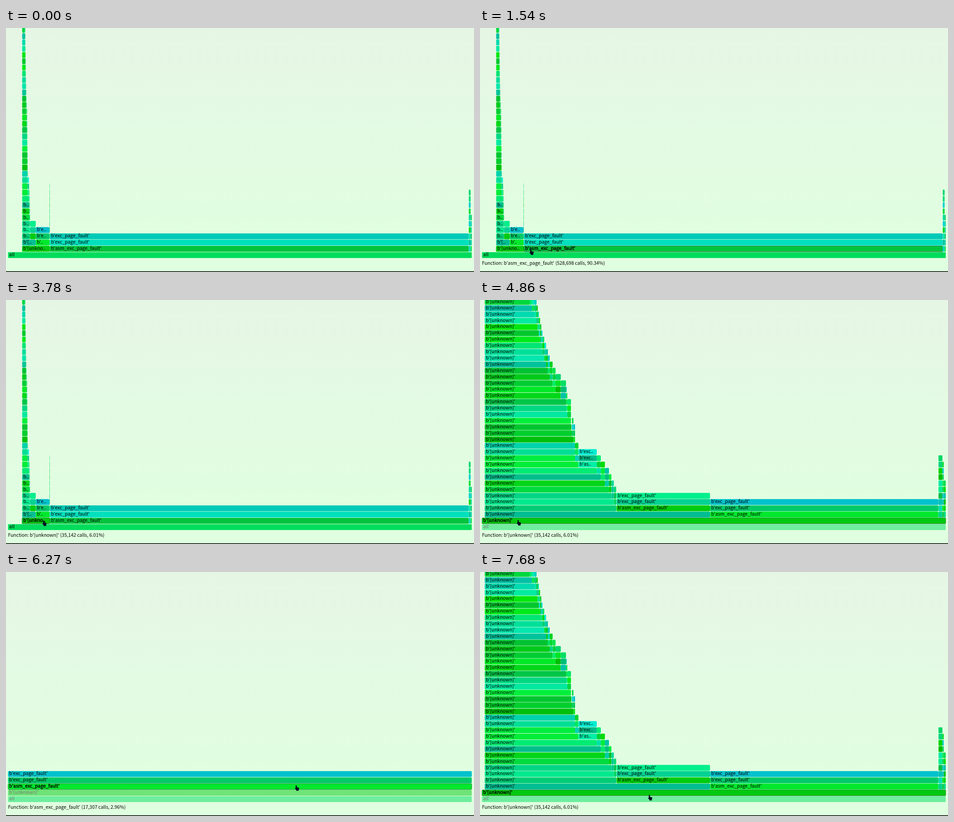
An HTML page for the animation above (8.08 s loop, 1034 by 542 pixels).

```html
<!DOCTYPE html>
<html lang="en">
<head>
<meta charset="utf-8">
<title>Flame graph</title>
<style>
  html, body { margin: 0; width: 100%; height: 100%; overflow: hidden; background: #e0ffe0; }
  svg { display: block; width: 1034px; height: 542px; }
  text { font-family: "Noto Sans CJK JP", "Noto Sans CJK SC", "Noto Sans CJK", sans-serif; font-size: 10.42px; fill: #000; }
  .hover { stroke: #000; stroke-width: .44px; }
  .parent { opacity: .5; }
</style>
</head>
<body>
<svg viewBox="0 0 1034 542">
  <defs>
    <linearGradient id="bg" x1="0" y1="0" x2="0" y2="1">
      <stop offset="0" stop-color="#e6f6e5"/>
      <stop offset=".94" stop-color="#e0ffe0"/>
    </linearGradient>
  </defs>
  <rect width="1034" height="542" fill="url(#bg)"/>
  <g id="graph"></g>
  <text id="status" x="4.5" y="525.7"></text>
  <rect y="540.5" width="1034" height="1.5" fill="#000"/>
  <path id="cursor" fill="#08081f" d="M-.1 1.1q0 -1.4 1.3 -1.4t1.3 1.4v3l4.1 .8q1.2 .4 1 2l-1 3.2v1.8h-5.2v-1.4l-2.8 -3.2q-.6 -1.2 .6 -1.6l.7 .4z"/>
</svg>
<script>
const $ = id => document.getElementById(id);
const LOOP = 8080, TOTAL = 585203;
const S = 0.8682, LEFT = 4.5, FULL = 1024.5, BASE = 497.9;
const EXC = "b'exc_page_fault'", ASM = "b'asm_exc_page_fault'", UNK = "b'[unknown]'";

let seed = 11;
const rnd = () => (seed = seed * 16807 % 2147483647) / 2147483647;
const shade = (lo = 0, hi = 210) => `rgb(0,${190 + 50 * rnd() | 0},${lo + (hi - lo) * rnd() | 0})`;
const teal = () => shade(115, 185);
const green = () => shade(10, 75);

const nodes = [];

function el(tag, parent, attrs = {}) {
  const e = document.createElementNS("http://www.w3.org/2000/svg", tag);
  for (const k in attrs) e.setAttribute(k, attrs[k]);
  return parent.appendChild(e);
}

function add(row, from, to, fill = shade(), name = UNK) {
  const g = el("g", $("graph"));
  const y = BASE - row * 16 * S;
  const rect = el("rect", g, { y, height: 15 * S, rx: 2 * S, fill });
  const label = el("text", g, { y: y + 10.5 * S });
  const calls = Math.round((to - from) / FULL * TOTAL);
  const node = { row, from, to, name, calls, g, rect, label, y };
  nodes.push(node);
  return node;
}

// The [unknown] subtree is laid out in the coordinates of its own zoomed view.
const UX = 35.4, UK = 35142 / TOTAL;
const sub = (row, a, b, ...rest) => add(row, UX + (a - LEFT) * UK, UX + (b - LEFT) * UK, ...rest);

function tower(place, from, to, first, last) {
  for (let row = first; row <= last; row++) place(row, from, to);
}

const all = add(0, LEFT, LEFT + FULL, "#00dc5c", "all");
const unknown = sub(1, LEFT, LEFT + FULL, "#00c910", UNK);
const asm = add(1, unknown.to, 1022.5, "#00c33e", ASM);
add(2, asm.from, asm.to, "#00e0be", EXC);
add(3, asm.from, asm.to, "#00cab6", EXC);

const MID = 301.5, SPLIT = 508.2, END = SPLIT + FULL * 17307 / 35142;
const asmSub = sub(2, SPLIT, END, "#00e82e", ASM);
sub(3, SPLIT, END, "#00ca68", EXC);
sub(4, SPLIT, END, "#00c1cc", EXC);
sub(3, MID, SPLIT, "#00cb0e", ASM);
sub(4, MID, SPLIT, "#00d292", EXC);
sub(5, MID, SPLIT, "#00ef8c", EXC);

// Right-hand outline of the deep stack: [row, x]
const outline = [
  [4, 301.5], [6, 301], [9, 285], [12, 258], [13, 217.5], [14, 210], [16, 210], [18, 203],
  [20, 201], [21, 193], [23, 190], [25, 167], [27, 154], [31, 138], [36, 125], [39, 110]
];

function edge(row) {
  const i = outline.findIndex(p => p[0] >= row);
  if (i < 1) return outline[0][1];
  const [r0, x0] = outline[i - 1], [r1, x1] = outline[i];
  return x0 + (x1 - x0) * (row - r0) / (r1 - r0);
}

// Teal and green runs alternate up the stack.
const hues = [4, 2, 2, 2, 2, 4, 2, 6, 4, 3, 3, 1].flatMap((n, i) => Array(n).fill(i % 2 ? green : teal));

// Each branch that leaves the stack is three cells tall.
hues.forEach((hue, i) => {
  const row = i + 2;
  let x = row === 2 ? SPLIT : edge(row + 3);
  sub(row, 10.5, x, hue());
  if (row < 4) return;
  for (let k = 2; k >= 0; k--) {
    const to = edge(row + k);
    if (to - x > 1) sub(row, x, to, shade(), k === 2 ? ASM : EXC);
    x = to;
  }
});

tower(sub, 1013, 1021.7, 2, 11);
tower(sub, 1021.7, 1024.6, 2, 10);
tower(sub, 1024.6, 1029, 2, 7);
tower(add, 1022.5, 1026.5, 1, 10);
tower(add, 1026.7, 1029, 1, 6);

const ctx = document.createElement("canvas").getContext("2d");
ctx.font = '10.42px "Noto Sans CJK JP", "Noto Sans CJK SC", "Noto Sans CJK", sans-serif';
const measure = s => ctx.measureText(s).width;

function fit(name, width) {
  const room = width - 3 * S;
  if (room < 14.16 * S) return "";
  if (measure(name) < room) return name;
  for (let n = name.length - 2; n > 0; n--)
    if (measure(name.slice(0, n + 2)) <= room) return name.slice(0, n) + "..";
  return "";
}

function zoom(target) {
  const k = FULL / (target.to - target.from), eps = 1e-4;
  for (const n of nodes) {
    const parent = n.row < target.row && n.from <= target.from + eps && n.to >= target.to - eps;
    const inside = n.row >= target.row && n.from >= target.from - eps && n.to <= target.to + eps;
    n.shown = parent || inside;
    n.g.style.display = n.shown ? "" : "none";
    if (!n.shown) continue;
    n.x = parent ? LEFT : LEFT + (n.from - target.from) * k;
    n.w = parent ? FULL : (n.to - n.from) * k;
    n.g.classList.toggle("parent", parent);
    n.rect.setAttribute("x", n.x);
    n.rect.setAttribute("width", n.w);
    n.label.setAttribute("x", n.x + 3 * S);
    n.label.textContent = fit(n.name, n.w);
  }
}

const views = [[0, all], [2040, asm], [2870, all], [4860, unknown], [6270, asmSub], [7680, unknown]];

// Pointer moves: start, end, x, y
const ENTER = 230, START = [150, 464];
const moves = [
  [230, 850, 82, 505.7], [1210, 1540, 111, 492], [2260, 2590, 111, 504.7], [2870, 3300, 82, 490],
  [3780, 4380, 80, 477], [4520, 4650, 83, 489], [4860, 5460, 645, 461.5], [5690, 5780, 640, 474],
  [6270, 6890, 386, 504], [7100, 7190, 373, 495.5]
];

function pointer(t) {
  let [x, y] = START;
  for (const [a, b, tx, ty] of moves) {
    if (t < a) break;
    const p = Math.min(1, (t - a) / (b - a)), e = p * p * (3 - 2 * p);
    x += (tx - x) * e;
    y += (ty - y) * e;
  }
  return [x, y];
}

function describe(n) {
  const pct = n === all ? "100" : (100 * n.calls / TOTAL).toFixed(2);
  return `Function: ${n.name} (${n.calls.toLocaleString("en-US")} calls, ${pct}%)`;
}

let view, hovered;

function draw(t) {
  const target = views.filter(v => v[0] <= t).pop()[1];
  if (target !== view) zoom(view = target);

  const active = t >= ENTER;
  const [x, y] = pointer(t);
  $("cursor").style.display = active ? "" : "none";
  $("cursor").setAttribute("transform", `translate(${x} ${y})`);

  const hit = active && nodes.find(n => n.shown && x >= n.x && x < n.x + n.w && y >= n.y - S && y < n.y + 15 * S);
  if (hit === hovered) return;
  if (hovered) hovered.g.classList.remove("hover");
  if (hit) hit.g.classList.add("hover");
  $("status").textContent = hit ? describe(hit) : "";
  hovered = hit;
}

const begin = performance.now();
function tick() {
  draw((performance.now() - begin) % LOOP);
  requestAnimationFrame(tick);
}
tick();
</script>
</body>
</html>
```
